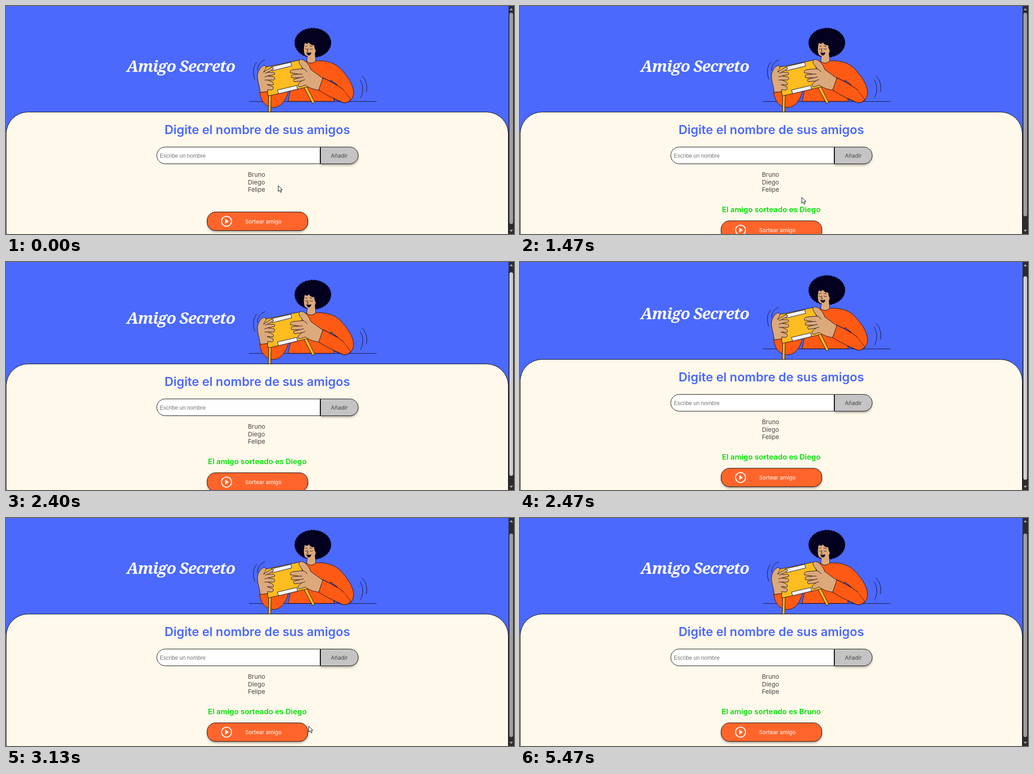
Write an HTML page that moves like this. It is 1115 px wide and 502 px high and loops after 6270 ms.

```html
<!DOCTYPE html>
<html lang="es">
<head>
<meta charset="utf-8">
<title>Amigo Secreto</title>
<style>
  html, body { margin: 0; width: 100%; height: 100%; overflow: hidden; background: #4b69fd; }
  svg { display: block; width: 100%; height: 100%; }
  text { font-family: Inter, sans-serif; }
  .ink { stroke: #160f24; stroke-width: 1; stroke-linejoin: round; stroke-linecap: round; }
  .line { fill: none; }
  .skin { fill: #dca97b; }
  .orange { fill: #ff5a14; }
  .yellow { fill: #fdbc20; }
  .tape { fill: #f1f2fa; }
  .frame { stroke: #000; stroke-width: 1; }
  .lift { filter: drop-shadow(0 3px 2px rgba(0, 0, 0, .3)); }
  .friends { font-size: 13.5px; fill: #444; }
  .mid { text-anchor: middle; }
  .logotype { font: italic 700 35px "Noto Serif", serif; letter-spacing: -1.3px; fill: #fff; }
</style>
</head>
<body>
<svg viewBox="0 0 1115 502" preserveAspectRatio="none">
  <rect width="1115" height="502" fill="#4b69fd"/>
  <g id="page">
    <text class="mid logotype" x="383.500" y="144.500">Amigo Secreto</text>

    <g id="art">
      <path class="ink line" d="M534 210.300H813M550 124C542 134 541 147 546 161M568 118.500C558 122 552 131 552 142M781 154C790 161 794 176 791 189M777 162C785 174 785 190 778 202"/>
      <path class="ink orange" d="M557 190C559 212 572 223 588 223.500C606 222 616 205 621 184L575 188Z"/>
      <path class="ink orange" d="M640 126L661 122Q670 129 680 121C704 119 724 126 736 140C750 155 761 171 763 189C763 204 755 213 743 213C735 212 727 208 719 204L721 210H619L630 160Z"/>
      <path class="ink" fill="#4b69fd" d="M713 163L712 167L727 174Z"/>
      <path class="ink orange" d="M695 158C710 165 726 173 741 185L757 206Q750 214 741 213C722 205 704 197 686 185Z"/>
      <path class="orange" d="M727 176Q735 180 741 185L757 205Q764 195 759 178L742 152Z"/>
      <path class="ink line" d="M696 158C712 166 728 173 741 185"/>
      <g id="hair" fill="#030020"><ellipse cx="673.500" cy="81" rx="38" ry="30.500"/></g>
      <path class="ink skin" d="M662 106L660 122Q670 130 680 121L678 101Z"/>
      <path class="skin" d="M656 81C653 91 653 101 656 107C660 112 668 111 674 106C680 105 681 97 678 95L676 86Q668 87 665 80Q661 86 656 81Z"/>
      <path class="ink line" d="M656.500 94Q659 97 661.500 94M667 94Q670 97 673 94M657 89L661 88M667 88L672 89M663 94L661 100H664"/>
      <path fill="#160f24" d="M659 102Q664 104 670 102Q670 108 664 109Q660 107 659 102Z"/>
      <path class="ink yellow" d="M577 196H582L581 236H576ZM655 180L660 177L677.500 212L673 214.500Z"/>
      <path class="ink yellow" d="M563 136L645 119L662 178L576 198Z"/>
      <path class="ink tape" d="M582.500 134L625 124L627 132L585 142.500ZM596 185L638 175L640 183L599 193Z"/>
      <path class="ink skin" d="M558 190C557 178 552 166 552 154C552 145 558 134 566 131C571 131 572 136 568 141L565 146L582 135Q588 134 587 139L574 146L586 146Q592 147 589 151L575 154L588 156Q592 159 588 163L575 163L584 167Q589 170 586 174L573 173L586 178Q589 184 582 185L574 184L575 188Z"/>
      <path class="ink line" d="M574 146L569 148M575 154L568 156M575 163L568 163"/>
      <path class="ink skin" d="M695 159L669 140C665 129 659 121 650 118C643 117 641 122 645 128L652 138L631 140Q623 141 624 147L642 150L629 151Q624 153 627 158L645 158L632 161Q629 165 634 167L649 165L641 172Q640 178 646 178L657 174C666 181 677 184 686 185Z"/>
      <path class="ink line" d="M642 150L650 150M645 158L653 156M649 165L656 162M652 138Q658 140 661 145"/>
    </g>

    <path class="frame" fill="#fff9eb" d="M.5 620V281.500A48 48 0 0 1 48.500 233.500H1054.500A48 48 0 0 1 1102.500 281.500V620Z"/>
    <text class="mid" x="551.500" y="282" fill="#4b69fd" font-size="27" font-weight="600">Digite el nombre de sus amigos</text>
    <path class="frame" fill="#fff" d="M689.500 310.500H349.500A18.500 18.500 0 0 0 349.500 347.500H689.500Z"/>
    <path class="frame lift" fill="#c4c4c4" d="M690.500 310.500H754.500A18.500 18.500 0 0 1 754.500 347.500H690.500Z"/>
    <text x="337.500" y="333.500" fill="#757575" font-size="12" style="font-family:'Liberation Sans',Arial,sans-serif">Escribe un nombre</text>
    <text class="mid" x="731.500" y="334" fill="#444" font-size="12">Añadir</text>
    <g class="friends">
      <text x="531" y="376">Bruno</text>
      <text x="531" y="392.500">Diego</text>
      <text x="531" y="409">Felipe</text>
    </g>
    <text id="result" class="mid" x="551.500" y="454" fill="#05df05" font-size="16.500" font-weight="600"></text>

    <g id="draw">
      <rect id="face" class="frame lift" x="441.500" y="453.500" width="221" height="41" rx="18.500"/>
      <circle cx="484" cy="474" r="11" fill="none" stroke="#fff" stroke-width="2.200"/>
      <path d="M481 468.500V479.500L489 474Z" fill="#fff"/>
      <text x="525" y="478.500" fill="#fff" font-size="12">Sortear amigo</text>
    </g>
  </g>

  <rect x="1103" width="12" height="502" fill="#2c2c2c"/>
  <path d="M1105 9.500L1109 4.500L1113 9.500ZM1105 492.500L1109 497.500L1113 492.500Z" fill="#9f9f9f"/>
  <rect id="thumb" x="1105" width="8" rx="4"/>

  <g id="cursor" fill="#fff" stroke="#000" stroke-width="1" stroke-linejoin="round">
    <path id="arrow" d="M.5 .5V13.300L3.500 10.600L5.600 15.300L7.800 14.300L5.800 9.700H9.700Z"/>
    <path id="hand" d="M-1.500 1.500Q0 -1 1.500 1.500V7Q3.300 5.500 4.300 7.500Q6 6.300 6.800 8.300Q8.700 7.700 9 10V14Q8.500 16.500 7.500 17.500V19.500H-.5V17.500L-4.800 12Q-5.500 9.300 -3.300 9.800L-1.500 11.500Z"/>
  </g>
</svg>
<script>
const $ = id => document.getElementById(id);
const set = (id, attrs) => {
  for (const name in attrs) $(id).setAttribute(name, attrs[name]);
};

const LOOP = 6270;
const TICK = 200 / 3;
const FIRST_DRAW = 17, SECOND_DRAW = 61;

// pointer path: tick, x, y
const path = [
  [0, 597, 395], [2, 597, 395], [3, 595, 398], [4, 593, 403], [9, 593, 403],
  [12, 574, 444], [14, 559, 470], [17, 559, 470], [21, 608, 428], [24, 638, 406],
  [28, 638, 406], [31, 960, 318], [33, 1113.5, 257], [35, 1113.5, 257],
  [36, 1118, 264], [39, 1118, 276], [42, 930, 400], [45, 718, 455],
  [47, 664, 458], [49, 640, 463], [51, 626, 466], [80, 626, 466],
  [81, 629, 479], [82, 650, 520], [94, 650, 520]
];

function pointer(k) {
  const i = path.findIndex(p => p[0] > k);
  if (i < 0) return path[path.length - 1].slice(1);
  const [k0, x0, y0] = path[i - 1], [k1, x1, y1] = path[i];
  const u = (k - k0) / (k1 - k0);
  return [x0 + (x1 - x0) * u, y0 + (y1 - y0) * u];
}

function scrollAt(k) {
  return k < 36 ? 0 : Math.min(22, 9 + (k - 36) * 10);
}

function curls() {
  const n = 38;
  for (let i = 0; i < n; i++) {
    const a = i / n * 2 * Math.PI;
    const c = document.createElementNS("http://www.w3.org/2000/svg", "circle");
    c.setAttribute("cx", 673.5 + 37 * Math.cos(a));
    c.setAttribute("cy", 81 + 29.6 * Math.sin(a));
    c.setAttribute("r", 3.4);
    $("hair").append(c);
  }
}

function render(t) {
  const k = Math.floor(t / TICK + 0.06);
  const drawn = k >= FIRST_DRAW;
  const scroll = scrollAt(k);
  const drop = drawn ? 19.5 : 0;
  const [x, y] = pointer(k);
  const top = 453 + drop - scroll;
  const hover = x > 442 && x < 662 && y > top && y < top + 42;
  const grip = k >= 32 && k < 40;

  set("page", { transform: `translate(0 ${-scroll})` });
  set("draw", { transform: `translate(0 ${drop})` });
  set("face", { fill: hover ? "#e55a22" : "#ff652b" });
  set("thumb", { y: 15 + scroll * 0.87, height: drawn ? 448 : 465, fill: grip ? "#cfcfcf" : "#9f9f9f" });
  set("cursor", { transform: `translate(${Math.round(x)} ${Math.round(y)})` });
  set("arrow", { visibility: hover ? "hidden" : "visible" });
  set("hand", { visibility: hover ? "visible" : "hidden" });
  const label = drawn ? "El amigo sorteado es " + (k < SECOND_DRAW ? "Diego" : "Bruno") : "";
  if ($("result").textContent !== label) $("result").textContent = label;
}

function loop() {
  render(performance.now() % LOOP);
  requestAnimationFrame(loop);
}

curls();
loop();
</script>
</body>
</html>
```
